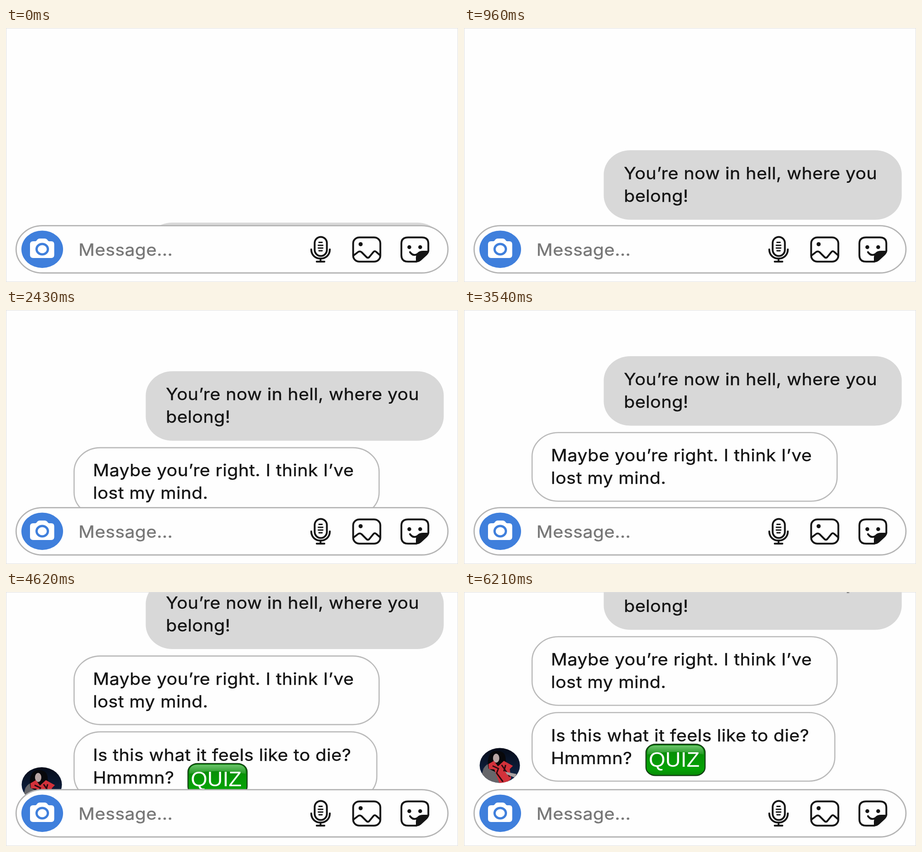
These frames come from a looping animation (998 by 561 pixels, 6660 ms). An HTML page:

```html
<!DOCTYPE html>
<html lang="en">
<head>
<meta charset="utf-8">
<title>Chat</title>
<style>
  html, body { margin: 0; width: 100%; height: 100%; overflow: hidden; background: #fefefe; }
  svg { display: block; width: 100vw; height: 100vh; }
  text { font-family: Inter, sans-serif; font-size: 37px; letter-spacing: .38px; fill: #141414; stroke: #141414; stroke-width: .4; }
  .hint { fill: #777; stroke: #777; }
  .badge { font: 47px 'Liberation Sans', Arial, sans-serif; letter-spacing: 0; fill: #fff; stroke: none; }
  .line { fill: none; stroke: #141414; stroke-width: 4; stroke-linecap: round; stroke-linejoin: round; }
  .outline { fill: #fefefe; stroke: #bababa; stroke-width: 2.6; }
  .ink { fill: #141414; }
</style>
</head>
<body>
<svg viewBox="0 0 998 561" preserveAspectRatio="none">
  <defs>
    <clipPath id="chatArea"><rect width="998" height="488"/></clipPath>
    <clipPath id="avatarShape"><ellipse cx="79" cy="723" rx="44.5" ry="38.5"/></clipPath>
    <linearGradient id="night" x2="0" y2="1">
      <stop stop-color="#050b18"/><stop offset="1" stop-color="#12284f"/>
    </linearGradient>
    <linearGradient id="green" x2="0" y2="1">
      <stop stop-color="#078507"/><stop offset=".8" stop-color="#05a305"/><stop offset="1" stop-color="#078807"/>
    </linearGradient>
    <linearGradient id="gloss" x2="0" y2="1">
      <stop stop-color="#6cc46c"/><stop offset="1" stop-color="#239a23"/>
    </linearGradient>
  </defs>

  <g clip-path="url(#chatArea)">
    <g id="thread">
      <rect x="308.5" y="270" width="658" height="153.5" rx="59" ry="54" fill="#d8d8d8"/>
      <g transform="translate(353 334) scale(1.07 1)"><text>You’re now in hell, where you</text><text y="50">belong!</text></g>

      <rect class="outline" x="150.3" y="438.8" width="673.5" height="151.5" rx="58" ry="53"/>
      <g transform="translate(192 502) scale(1.07 1)"><text>Maybe you’re right. I think I’ve</text><text y="50">lost my mind.</text></g>

      <rect class="outline" x="150.3" y="606.3" width="668.5" height="151.5" rx="58" ry="53"/>
      <g transform="translate(192 670) scale(1.07 1)"><text>Is this what it feels like to die?</text><text y="50">Hmmmn?</text></g>

      <rect x="401.8" y="676.3" width="130.5" height="69" rx="21" ry="18" fill="url(#green)" stroke="#123f12" stroke-width="2.4"/>
      <path d="M405 699V695Q405 679 423 679H511Q529 679 529 695V699Q467 687 405 699Z" fill="url(#gloss)"/>
      <text class="badge" x="408" y="726">QUIZ</text>

      <g clip-path="url(#avatarShape)">
        <rect x="34" y="684" width="90" height="78" fill="url(#night)"/>
        <path d="M34 762L43 730Q50 718 65 716L78 762Z" fill="#66666a"/>
        <path d="M54 730Q50 710 57 699Q62 689 76 691Q92 693 92 709Q95 722 88 732L70 738Z" fill="#08080b"/>
        <ellipse cx="71" cy="707" rx="7" ry="10" fill="#b9a6a4"/>
        <path d="M54 720L66 713L75 725L88 713L97 718L108 724L101 731L104 752L94 762H78L67 732L55 731Z" fill="#d3313a"/>
        <path d="M63 724L76 730L72 740L86 759M83 722L101 748M92 722L88 736" fill="none" stroke="#2a0a10" stroke-width="3"/>
        <path d="M91 737L116 742L112 750L95 743Z" fill="#a9a1a2"/>
      </g>
    </g>
  </g>

  <rect x="22.3" y="436.7" width="953.5" height="104.3" rx="58" ry="52.15" fill="#fefefe" stroke="#b4b4b4" stroke-width="2.8"/>
  <ellipse cx="80" cy="488.7" rx="46" ry="41.3" fill="#3f7fdc"/>
  <path d="M60 471H65Q67 471 69 467.5Q71 465 74 465H86Q89 465 91 467.5Q93 471 95 471H100Q106.5 471 106.5 478V501Q106.5 508 100 508H60Q53 508 53 501V478Q53 471 60 471Z" fill="#fff"/>
  <ellipse cx="80" cy="488.5" rx="12.5" ry="11.5" fill="none" stroke="#3f7fdc" stroke-width="5"/>
  <g transform="translate(160 503) scale(1.07 1)"><text class="hint">Message...</text></g>

  <g class="line">
    <rect x="681.5" y="461.5" width="27" height="42" rx="13.5"/>
    <path d="M674 489C674 516 715 516 715 489M694.5 510V515M686 516H703"/>
    <path d="M691 473.5H698M689.5 480H699.5M689.5 486H699.5M691 492H698" stroke-width="2.8"/>
    <rect x="766.5" y="462.5" width="60" height="53.5" rx="14" ry="13"/>
    <path d="M768 502L777 495Q781 492 785 495L796 506Q799 509 802 506L811 495Q814 491 818 495L826 502"/>
    <path d="M906 516H888Q873 516 873 502V476Q873 462.5 888 462.5H918Q932.5 462.5 932.5 476V492"/>
    <path d="M892 495Q899 505 909 499"/>
  </g>
  <circle class="ink" cx="783" cy="477.5" r="4.5"/>
  <circle class="ink" cx="890.5" cy="484" r="4.3"/>
  <circle class="ink" cx="914.5" cy="484" r="4.3"/>
  <path class="ink" d="M905 517.5V508Q905 492 921 492H934.5Q934 497 929 502L917 513Q912 517.5 905 517.5Z"/>
  <rect x=".5" y=".5" width="997" height="560" fill="none" stroke="#e0e0e0"/>
</svg>
<script>
const LOOP = 6660, STEP = 30, GLIDE = 360;
// Each scroll eases from `start`, but first becomes visible at `shown`.
const scrolls = [
  { start: -6, shown: 0, distance: 168 },
  { start: 2280, shown: 2280, distance: 168 },
  { start: 4486, shown: 4560, distance: 172 },
];
const thread = document.getElementById('thread');
const easeOut = x => 1 - (1 - Math.min(1, Math.max(0, x))) ** 3;

function draw(now) {
  const t = Math.floor((now % LOOP) / STEP) * STEP;
  const offset = scrolls.reduce((sum, { start, shown, distance }) =>
    t < shown ? sum : sum + distance * easeOut((t - start) / GLIDE), -168);
  thread.setAttribute('transform', `translate(0 ${-offset})`);
}

const began = performance.now();
function tick() {
  draw(performance.now() - began);
  requestAnimationFrame(tick);
}
tick();
</script>
</body>
</html>
```
